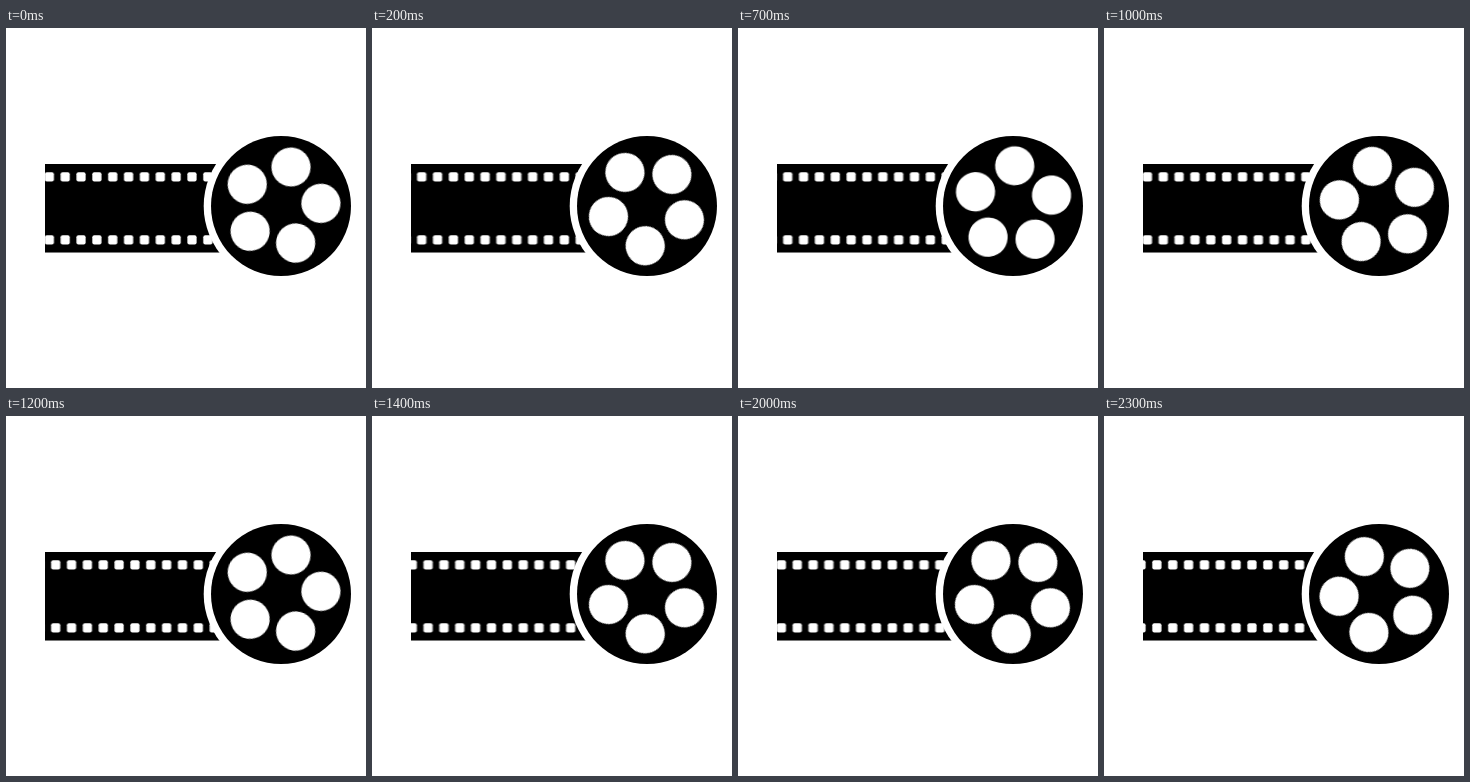
An HTML page that plays this animation: 360 px wide and 360 px high, repeating every 2400 ms.

```html
<!DOCTYPE html>
<html lang="en">
<head>
<meta charset="utf-8">
<title>Film reel</title>
<style>
  html, body { margin: 0; width: 100%; height: 100%; overflow: hidden; background: #fff; }
  svg { display: block; width: 100vw; height: 100vh; }

  .perforations { animation: feed 2400ms steps(24) infinite; }
  .holes { animation: spin 600ms step-end infinite; }

  /* 24 steps, each a fifth of the 15.85px pitch */
  @keyframes feed {
    from { transform: translateX(0); }
    to { transform: translateX(76.08px); }
  }

  /* The reel rocks back 12deg, then forward 36deg */
  @keyframes spin {
    0% { transform: rotate(0deg); }
    16.6667% { transform: rotate(-12deg); }
    33.3333% { transform: rotate(24deg); }
    50% { transform: rotate(12deg); }
    66.6667% { transform: rotate(48deg); }
    83.3333% { transform: rotate(36deg); }
    100% { transform: rotate(72deg); }
  }
</style>
</head>
<body>
<svg viewBox="0 0 360 360">
  <defs>
    <clipPath id="strip"><rect x="39" y="136" width="200" height="88.7"/></clipPath>
    <pattern id="row" x="51.3" y="136" width="15.85" height="90" patternUnits="userSpaceOnUse">
      <rect x="3.3" y="8.2" width="9.2" height="9.2" rx="2"/>
      <rect x="3.3" y="71.3" width="9.2" height="9.2" rx="2"/>
    </pattern>
    <circle id="hole" cy="-40" r="19.6"/>
  </defs>

  <g clip-path="url(#strip)">
    <rect x="39" y="136" width="200" height="88.7"/>
    <g class="perforations" fill="#fff">
      <svg x="0" y="0" width="360" height="360" overflow="visible">
        <rect x="-80" y="136" width="340" height="90" fill="url(#row)" style="filter:invert(1)"/>
      </svg>
    </g>
  </g>

  <circle cx="275" cy="178" r="77.3" fill="#fff"/>
  <circle cx="275" cy="178" r="70"/>
  <g transform="translate(275 177.8) rotate(14.5)" fill="#fff">
    <g class="holes">
      <use href="#hole"/>
      <use href="#hole" transform="rotate(72)"/>
      <use href="#hole" transform="rotate(144)"/>
      <use href="#hole" transform="rotate(216)"/>
      <use href="#hole" transform="rotate(288)"/>
    </g>
  </g>
</svg>
</body>
</html>
```
